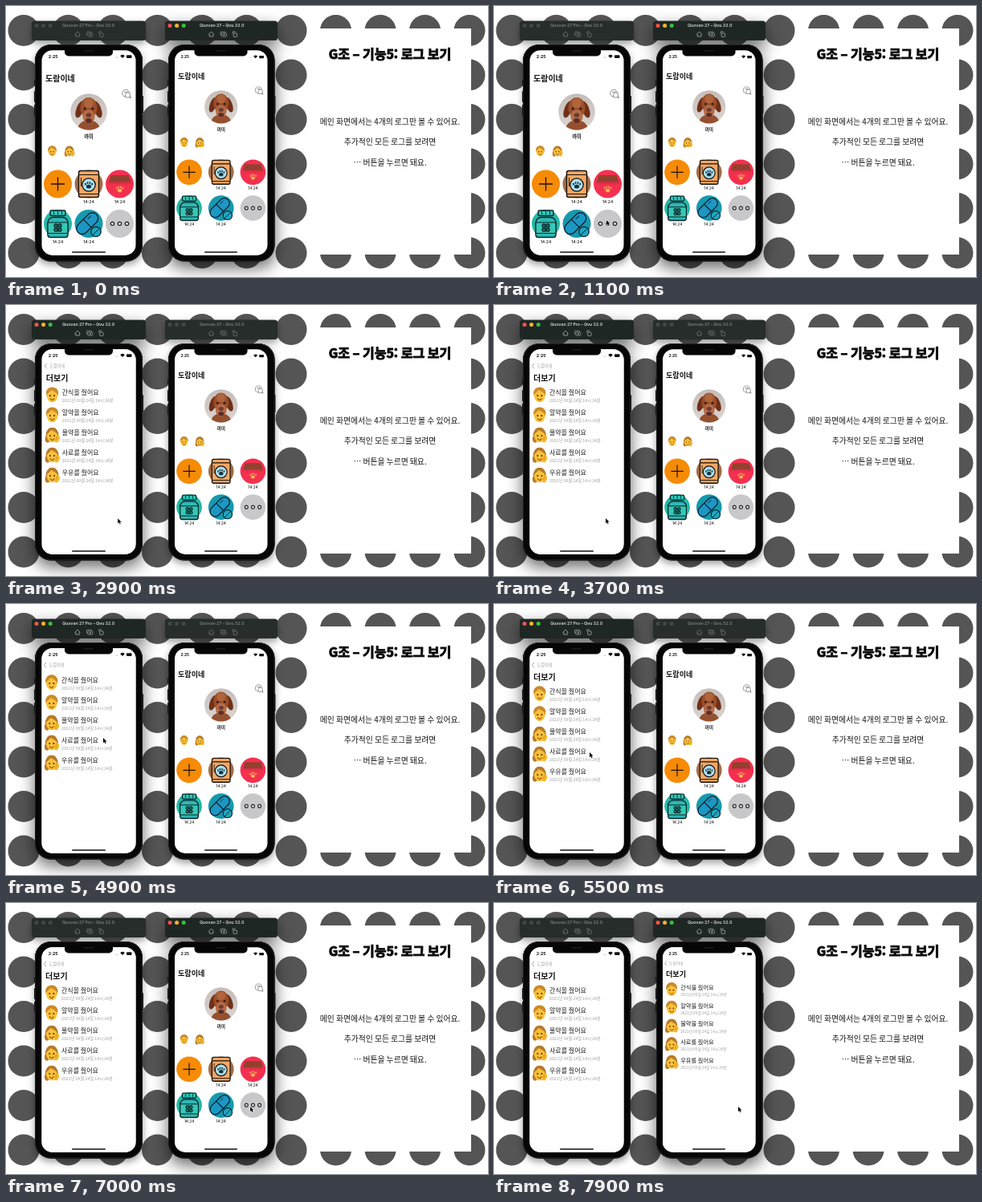
Recreate the animation shown at these times as an HTML page with a canvas. Size 600 by 338 pixels, loop 8000 ms.

```html
<!DOCTYPE html>
<html lang="ko">
<head>
<meta charset="utf-8">
<style>
html, body { margin: 0; width: 100%; height: 100%; overflow: hidden; background: #fff; }
canvas { display: block; width: 600px; height: 338px; }
</style>
</head>
<body>
<canvas id="stage"></canvas>
<script>
const W = 600, H = 338, LOOP = 8000, TAU = Math.PI * 2;
const KR = '"Noto Sans CJK KR", "Noto Sans CJK", sans-serif';
const UI = 'Inter, sans-serif';
const FAMILY = '도람이네';
const LOGS = ['간식을 줬어요', '알약을 줬어요', '물약을 줬어요', '사료를 줬어요', '우유를 줬어요'];
const FOCUS = [2370, 6930];
const PRESS = 4320, RELEASE = 4930;

const canvas = document.getElementById('stage');
const ctx = canvas.getContext('2d');
const dpr = window.devicePixelRatio || 1;
canvas.width = W * dpr;
canvas.height = H * dpr;

const phones = [
  { x: 44, w: 118, s: 1, y: 0, cx: 103, body: [36, 134], bar: [32, 142],
    name: 'Quovan 27 Pro – Qvu 32.0', titleX: 70, tools: 89, notch: 60, home: 42, push: 2420 },
  { x: 209.5, w: 128.7, s: 0.905, y: 6.4, cx: 267.5, body: [202, 132.5], bar: [198, 140],
    name: 'Quovan 27 – Qvu 32.0', titleX: 241, tools: 255.5, notch: 66, home: 41, push: 7150 }
];

// time, x, y of the pointer
const path = [
  [150, 165, 309], [850, 141, 269], [3700, 140, 268], [3950, 136, 289],
  [PRESS, 122, 196], [4800, 122, 169], [RELEASE, 122, 169], [5400, 120, 187],
  [5650, 120, 187], [6600, 305, 256]
];

const clamp = v => Math.max(0, Math.min(1, v));
const smooth = v => { v = clamp(v); return v * v * (3 - 2 * v); };
const spring = ms => ms <= 0 ? 0 : ms > 600 ? 1 : 1 - (1 + ms / 67) * Math.exp(-ms / 67);
const rubber = d => 256 * (1 - 1 / (d * 0.55 / 256 + 1));

function pointerAt(t) {
  let i = 0;
  while (i < path.length - 1 && t >= path[i + 1][0]) i++;
  const a = path[i], b = path[Math.min(i + 1, path.length - 1)];
  const k = a === b ? 0 : smooth((t - a[0]) / (b[0] - a[0]));
  return [a[1] + (b[1] - a[1]) * k, a[2] + (b[2] - a[2]) * k];
}

// The list follows the drag with resistance, then springs back.
function scrollAt(t) {
  if (t < PRESS) return 0;
  const held = rubber(pointerAt(PRESS)[1] - pointerAt(Math.min(t, RELEASE))[1]);
  return held * (1 - spring(t - RELEASE));
}

function text(str, x, y, size, color, weight = 400, align = 'left', font = KR) {
  ctx.font = `${weight} ${size}px ${font}`;
  ctx.textAlign = align;
  ctx.textBaseline = 'alphabetic';
  ctx.fillStyle = color;
  ctx.fillText(str, x, y + size * 0.36);
}

function paint(fill, stroke, width = 1) {
  if (fill) { ctx.fillStyle = fill; ctx.fill(); }
  if (stroke) { ctx.strokeStyle = stroke; ctx.lineWidth = width; ctx.stroke(); }
}

function disc(x, y, r, fill, stroke, width) {
  ctx.beginPath();
  ctx.arc(x, y, r, 0, TAU);
  paint(fill, stroke, width);
}

function oval(x, y, rx, ry, fill, tilt = 0) {
  ctx.beginPath();
  ctx.ellipse(x, y, rx, ry, tilt, 0, TAU);
  paint(fill);
}

function box(x, y, w, h, r, fill, stroke, width) {
  ctx.beginPath();
  ctx.roundRect(x, y, w, h, r);
  paint(fill, stroke, width);
}

function line(points, color, width = 1) {
  ctx.beginPath();
  points.forEach(([x, y], i) => i ? ctx.lineTo(x, y) : ctx.moveTo(x, y));
  paint(null, color, width);
}

function at(x, y, scale, draw) {
  ctx.save();
  ctx.translate(x, y);
  ctx.scale(scale, scale);
  draw();
  ctx.restore();
}

function paw(x, y, r, color) {
  oval(x, y + r * 0.45, r * 0.62, r * 0.5, color);
  [-0.85, -0.3, 0.3, 0.85].forEach(k =>
    oval(x + k * r, y - r * (0.65 - Math.abs(k) * 0.55), r * 0.2, r * 0.3, color, k * 0.4));
}

const icons = [
  () => {
    disc(0, 0, 17.5, '#f68b06');
    line([[-8.5, 0], [8.5, 0]], '#1a1205', 1.3);
    line([[0, -8.5], [0, 8.5]], '#1a1205', 1.3);
  },
  () => {
    const ink = '#17110e';
    disc(0, 0, 17.5, '#a06d48');
    box(-12.5, -16.5, 25, 33, 2.5, '#f4a765', ink, 1.4);
    line([[-12.5, -11.5], [12.5, -11.5]], ink, 1.2);
    line([[-9.5, -8], [-9.5, 3]], ink, 0.9);
    line([[-12.5, 12.5], [12.5, 12.5]], ink, 1.1);
    disc(0, 1, 8.2, '#a8dff0', ink, 1.3);
    paw(0, 1, 4.8, '#16313a');
  },
  () => {
    disc(0, 0, 17.5, '#f4304f');
    ctx.beginPath();
    ctx.moveTo(-11, -11);
    ctx.lineTo(11, -11);
    ctx.lineTo(14, -2);
    ctx.lineTo(-14, -2);
    ctx.closePath();
    paint('#94402f');
    box(-15, -2.5, 30, 2.4, 1, '#de2d4a');
    paw(0, 6, 4.6, '#f8ae55');
  },
  () => {
    const ink = '#0b2425';
    disc(0, 0, 17.5, '#20b9a9');
    box(-9.5, -16.5, 19, 6.5, 1.5, '#2bc8bb', ink, 1.4);
    [-5, 0, 5].forEach(x => line([[x, -15.5], [x, -11.5]], ink, 0.9));
    box(-12.5, -8, 25, 25, [7, 7, 3, 3], '#2fb7b5', ink, 1.4);
    box(-12.5, -1.5, 25, 13.5, 0, '#35c8b6', ink, 1.2);
    for (let i = 0; i < 4; i++) {
      const a = TAU * (i + 0.5) / 4;
      disc(Math.cos(a) * 3.4, 5 + Math.sin(a) * 3.4, 2.2, '#1b6f6c', ink, 1.1);
    }
    line([[0, 5], [0, 10]], ink, 1);
  },
  () => {
    const ink = '#0a2533';
    disc(0, 0, 17.5, '#1699ae');
    ctx.save();
    ctx.rotate(-0.78);
    box(-17, -8.5, 32, 14, 7, '#1c97c4', ink, 1.4);
    line([[-1, -8.5], [-1, 5.5]], ink, 1.3);
    line([[3, -5], [9, -5]], ink, 1);
    ctx.restore();
    disc(9, 10, 6.2, '#1ea6c0', ink, 1.3);
    line([[5, 14], [13, 6]], ink, 1);
  },
  () => {
    disc(0, 0, 17.5, '#c8c8ca');
    [-9, 0, 9].forEach(x => disc(x, 0, 2.2, '#e4e4e6', '#1c1c1c', 1.2));
  }
];

function face(raised) {
  const hair = raised ? '#b57a2c' : '#c98a2b';
  if (raised) {
    oval(0, 0, 6.2, 7, hair);
    oval(-4.5, 4, 2.4, 3.6, hair);
  } else {
    oval(0, -1.7, 6, 5.8, hair);
  }
  oval(0, 1, 5.3, 6.2, '#f9c139');
  ctx.beginPath();
  ctx.moveTo(-5.5, -0.5);
  ctx.quadraticCurveTo(-3, -2, -1, -4.6);
  ctx.quadraticCurveTo(3, -3, 5.5, -0.5);
  ctx.quadraticCurveTo(5.5, -7.3, 0, -7.3);
  ctx.quadraticCurveTo(-5.5, -7.3, -5.5, -0.5);
  paint(hair);
  disc(-2, 0.8, 0.8, '#4a2d13');
  disc(2, 0.8, 0.8, '#4a2d13');
  ctx.beginPath();
  ctx.arc(0, 3, 2, 0.2, Math.PI - 0.2);
  paint(null, '#8a4a18', 0.8);
  if (raised) {
    oval(4.8, 4, 2.3, 3.4, '#f5b92e', 0.4);
    line([[4.6, 1.4], [4, 5]], '#c98818', 0.6);
  }
}

function dog() {
  const bg = ctx.createLinearGradient(0, -23, 0, 23);
  bg.addColorStop(0, '#c4bdb9');
  bg.addColorStop(1, '#dcd6d2');
  disc(0, 0, 22.8, bg);
  ctx.save();
  ctx.clip();
  oval(0, 23, 14, 13, '#94502f');
  oval(-11, -3, 4.5, 11, '#6f3018', 0.35);
  oval(11, -3, 4.5, 11, '#6f3018', -0.35);
  oval(0, -5, 10.5, 13, '#9a4e2a');
  oval(0, -11, 6, 6, '#b0653c');
  oval(0, 6, 7.5, 8.5, '#b46c48');
  oval(0, 11, 4, 3, '#5e2c24');
  disc(-4.8, -4, 1.5, '#2a1710');
  disc(4.8, -4, 1.5, '#2a1710');
  oval(0, 4, 3.4, 2.7, '#6d3b35');
  ctx.restore();
}

function chat(x, y) {
  disc(x - 0.8, y - 0.6, 4.5, '#fff', '#777', 0.8);
  disc(x + 1.6, y + 1.6, 3.2, '#fff', '#777', 0.8);
  line([[x + 3.5, y + 4.4], [x + 5.4, y + 5.4], [x + 4.8, y + 3]], '#777', 0.8);
  line([[x - 3, y - 2.2], [x + 1.8, y - 2.2]], '#777', 0.8);
}

function homeView(w) {
  const cols = [20.5, w / 2, w - 20.5];
  text(FAMILY, 5, 90, 10, '#111', 700);
  chat(w - 12, 109.5);
  at(w / 2, 132, 1, dog);
  text('까미', w / 2, 163, 6.3, '#222', 700, 'center');
  at(13.5, 181, 0.9, () => face(false));
  at(35, 181, 0.9, () => face(true));
  icons.forEach((icon, i) => {
    const x = cols[i % 3], y = i < 3 ? 222 : 271.5;
    at(x, y, 1, icon);
    if (i && i < 5) text('14:24', x, y + 22.6, 5.2, '#222', 500, 'center', UI);
  });
}

function listView(w, scroll) {
  ctx.fillStyle = '#fff';
  ctx.fillRect(0, 40, w, 310);
  ctx.save();
  ctx.beginPath();
  ctx.rect(0, 83, w, 280);
  ctx.clip();
  ctx.translate(0, -scroll);
  text('더보기', 5, 91, 10, '#111', 700);
  LOGS.forEach((log, i) => {
    const y = 110 + i * 25;
    at(12.8, y + 2, 1.28, () => face(i > 1));
    text(log, 25, y - 0.4, 8, '#1c1c1c', 500);
    text('2021년 09월 24일 14시 24분', 25, y + 9.6, 5.25, '#a0a0a0');
  });
  ctx.restore();
  line([[6, 73], [3.5, 76.2], [6, 79.4]], '#8e8e93', 0.8);
  text(FAMILY, 9.5, 76.2, 5.2, '#a2a2a4');
}

function statusBar(w) {
  text('2:25', 8.8, 62.8, 5.3, '#111', 700, 'left', UI);
  disc(w - 25, 64, 0.5, '#999');
  disc(w - 23.2, 64, 0.5, '#999');
  ctx.beginPath();
  ctx.moveTo(w - 17, 65);
  ctx.arc(w - 17, 65, 4, -2.35, -0.79);
  ctx.closePath();
  paint('#111');
  box(w - 12, 61.3, 6.5, 3.6, 1, '#111');
}

function barShape(p, fill) {
  box(p.bar[0], 18.7, p.bar[1], 24, 3.5, fill);
}

function bodyShape(p, fill) {
  box(p.body[0], 48, p.body[1], 270.5, 20, fill);
}

// Bar and body share one window shadow, laid down before either is drawn.
function windowShadow(p, active) {
  ctx.save();
  ctx.shadowColor = `rgba(0,0,0,${active ? 0.6 : 0.4})`;
  ctx.shadowBlur = (active ? 20 : 10) * dpr;
  ctx.shadowOffsetY = (active ? 8 : 4) * dpr;
  barShape(p, '#222');
  bodyShape(p, '#060606');
  ctx.restore();
}

function titleBar(p, active) {
  const x = p.bar[0], ground = active ? '#1f2725' : '#262d2b';
  barShape(p, ground);
  const tint = active ? '#c5c9c8' : '#737977';
  const lights = active ? ['#fb5149', '#f9b52c', '#33c43f'] : ['#424846', '#424846', '#424846'];
  lights.forEach((c, i) => disc(x + 6 + i * 8.6, 24.5, 2.5, c));
  text(p.name, p.titleX, 24.6, 5.2, tint, 700, 'left', UI);

  const a = p.tools, b = a + 14.7, c = a + 29.6, ink = active ? '#a8adab' : '#747a78';
  line([[a - 3.5, 35.5], [a, 32], [a + 3.5, 35.5]], ink, 0.8);
  line([[a - 2.3, 35], [a - 2.3, 38], [a + 2.3, 38], [a + 2.3, 35]], ink, 0.8);
  box(b - 3.2, 32.3, 6, 4, 0.8, null, ink, 0.7);
  box(b - 1.8, 34, 6, 4, 0.8, ground, ink, 0.7);
  disc(b + 1.2, 36, 0.9, ink);
  box(c - 2, 34, 4.5, 4.4, 0.8, null, ink, 0.8);
  line([[c + 0.5, 32], [c - 2.8, 32], [c - 2.8, 34.2]], ink, 0.8);
}

function phone(p, t, scroll) {
  const [x, w] = p.body;
  [[92, 7], [106, 14], [123, 14]].forEach(([y, h]) => box(x - 1, y, 2, h, 0.7, '#161616'));
  box(x + w - 1, 112, 2, 22, 0.7, '#161616');
  bodyShape(p, '#060606');
  box(x + 0.6, 48.6, w - 1.2, 269.3, 19.5, null, '#2a2b2c', 0.8);

  ctx.save();
  box(p.x + 0.5, 55.2, p.w * p.s - 1, 255.7, 13, '#fff');
  ctx.clip();
  const k = spring(t - p.push);
  ctx.translate(p.x, p.y);
  ctx.scale(p.s, p.s);
  if (k < 1) at(-0.3 * k * p.w, 0, 1, () => homeView(p.w));
  if (k > 0) at((1 - k) * p.w, 0, 1, () => listView(p.w, scroll));
  statusBar(p.w);
  ctx.restore();
  box(p.cx - p.notch / 2, 52, p.notch, 10.5, [0, 0, 5, 5], '#060606');
  box(p.cx - 6, 55.3, 12, 1.3, 0.6, '#222');
  box(p.cx - p.home / 2, 306.2, p.home, 1.5, 0.7, '#111');
}

function headline(str, x, y, size) {
  text(str, x, y, size, '#080808', 900, 'center');
  ctx.strokeStyle = '#080808';
  ctx.lineWidth = 0.9;
  ctx.lineJoin = 'miter';
  ctx.strokeText(str, x, y + size * 0.36);
}

function backdrop() {
  ctx.fillStyle = '#fff';
  ctx.fillRect(0, 0, W, H);
  for (let c = 0; c < 11; c++)
    for (let r = 0; r < 6; r++) disc(22 + c * 55.5, 30.5 + r * 55.5, 19.5, '#555');
  ctx.fillStyle = '#fff';
  ctx.fillRect(377, 28, 202, 282);
  headline('G조 – 기능5: 로그 보기', 478, 60, 16);
  text('메인 화면에서는 4개의 로그만 볼 수 있어요.', 478, 144, 9.8, '#111', 500, 'center');
  text('추가적인 모든 로그를 보려면', 478, 169.5, 9.8, '#111', 500, 'center');
  text('⋯ 버튼을 누르면 돼요.', 478, 195, 9.8, '#111', 500, 'center');
}

function pointer(x, y) {
  const pts = [[0, 0], [0, 6.2], [1.5, 4.9], [2.5, 7.2], [3.5, 6.8], [2.5, 4.6], [4.5, 4.5]];
  ctx.beginPath();
  pts.forEach(([dx, dy]) => ctx.lineTo(x - 1 + dx, y - 2 + dy));
  ctx.closePath();
  ctx.lineJoin = 'round';
  paint(null, '#fff', 1.2);
  paint('#000');
}

function draw(t) {
  ctx.setTransform(dpr, 0, 0, dpr, 0, 0);
  backdrop();
  const front = t >= FOCUS[0] && t < FOCUS[1] ? 0 : 1;
  phones.forEach((p, i) => windowShadow(p, i === front));
  phones.forEach((p, i) => {
    phone(p, t, i === 0 ? scrollAt(t) : 0);
    titleBar(p, i === front);
  });
  if (t >= 150) pointer(...pointerAt(t));
}

const start = performance.now();
function tick() {
  draw((performance.now() - start) % LOOP);
  requestAnimationFrame(tick);
}
tick();
</script>
</body>
</html>
```
